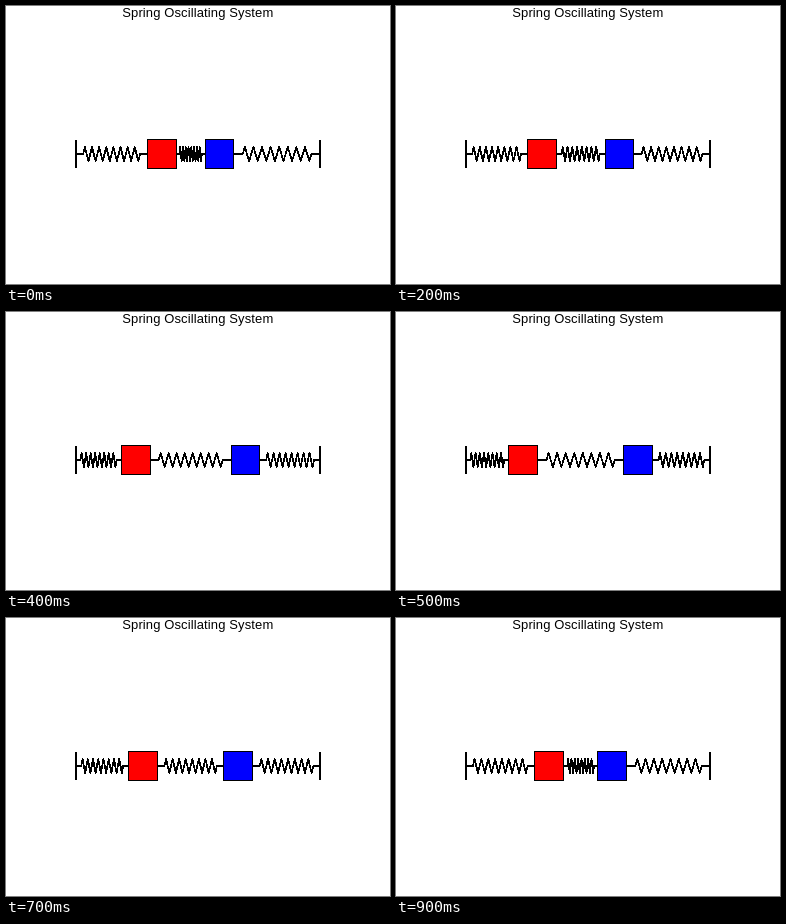
Animation of 384x278 px, one loop 1000 ms. Source, as an HTML page:

```html
<!DOCTYPE html>
<html lang="en">
<head>
<meta charset="utf-8">
<title>Spring Oscillating System</title>
<style>
  html, body { margin: 0; width: 100%; height: 100%; overflow: hidden; background: #fff; }
  svg { display: block; width: 100%; height: 100%; }
  text { font: 13px "Liberation Sans", Arial, sans-serif; letter-spacing: 0.12px; text-anchor: middle; }
  path, rect { shape-rendering: crispEdges; stroke: #000; }
  path { fill: none; stroke-width: 2; stroke-linejoin: round; }
  .spring { stroke-width: 1.8; }
</style>
</head>
<body>
<svg viewBox="0 0 384 278">
  <text x="191.8" y="11">Spring Oscillating System</text>
  <path d="M70 134V162M314 134V162"/>
  <path class="spring"/>
  <path class="spring"/>
  <path class="spring"/>
  <rect id="red" y="133.5" height="29" fill="#f00"/>
  <rect id="blue" y="133.5" height="29" fill="#00f"/>
</svg>
<script>
const LOOP = 1000, STEPS = 10;
const LEFT = 70, RIGHT = 314, MID = 148;
const SIZE = 28.5, SWING = 14.4, COILS = 8, HEIGHT = 7;
const springs = document.querySelectorAll(".spring");
const red = document.getElementById("red");
const blue = document.getElementById("blue");

// Straight leads take a tenth of the length at each end.
function springPath(a, b) {
  const lead = (b - a) * 0.1;
  const pitch = (b - a - 2 * lead) / COILS;
  let d = `M${a} ${MID}H${a + lead}`;
  for (let i = 0; i < COILS; i++) {
    const x = a + lead + i * pitch;
    d += `L${x + pitch / 4} ${MID - HEIGHT}L${x + pitch * 0.75} ${MID + HEIGHT}`;
  }
  return d + `L${b - lead} ${MID}H${b}`;
}

function placeBox(box, x) {
  const from = Math.round(x), to = Math.round(x + SIZE);
  box.setAttribute("x", from + 0.5);
  box.setAttribute("width", to - from);
}

function draw(time) {
  const step = Math.floor((time % LOOP) / LOOP * STEPS);
  const shift = SWING * Math.cos(2 * Math.PI * step / STEPS);
  const redX = 126.8 + shift, blueX = 213 - shift;
  const spans = [[LEFT, redX], [redX + SIZE + 1, blueX], [blueX + SIZE + 1, RIGHT]];
  spans.forEach(([a, b], i) => springs[i].setAttribute("d", springPath(a, b)));
  placeBox(red, redX);
  placeBox(blue, blueX);
}

const start = performance.now();
function tick() {
  draw(performance.now() - start);
  requestAnimationFrame(tick);
}
tick();
</script>
</body>
</html>
```
